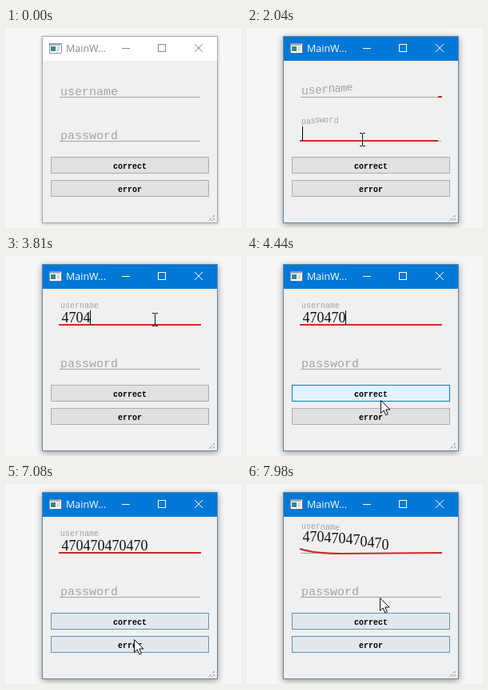
These frames come from a looping animation (294 px wide and 250 px high, 8000 ms). An HTML page:

```html
<!DOCTYPE html>
<html lang="en">
<head>
<meta charset="utf-8">
<title>Floating label form</title>
<style>
html, body { margin: 0; width: 100%; height: 100%; overflow: hidden; background: #f7f7f7; }
svg { display: block; width: 294px; height: 250px; --ink: #8a8a8a; --bar: #fff; --edge: #a9a9a9; }
svg.active { --ink: #fff; --bar: #0078d7; --edge: #5d87aa; }
rect, .crisp { shape-rendering: crispEdges; }
#frame { fill: #f0f0f0; stroke: var(--edge); filter: drop-shadow(0 1px 2px #0004); }
.active #frame { filter: drop-shadow(0 2px 4px #0006); }
#bar { fill: var(--bar); }
.ink { stroke: var(--ink); fill: none; }
#title { font: 12.5px "Open Sans", sans-serif; fill: var(--ink); }
.label { font-family: "Liberation Mono", monospace; fill: #a3a3a3; text-anchor: middle; }
.digit { font: 18px "Liberation Serif", serif; fill: #111; }
.button text { font: bold 10px "Liberation Mono", monospace; text-anchor: middle; }
.rule { fill: #a0a0a0; }
.red { fill: #cb2a2a; }
</style>
</head>
<body>
<svg id="stage" viewBox="0 0 294 250">
  <rect id="frame" x="45.5" y="10.5" width="219" height="233"/>
  <rect id="bar" x="46" y="11" width="218" height="30"/>
  <g class="crisp">
    <path d="M54 19h15v12h-15z" fill="#fff" stroke="#777" stroke-width=".8"/>
    <path d="M55 19.5h13v2h-13z" fill="#9bb4c8"/>
    <path d="M56 23h6v6h-6z" fill="#36858a"/>
    <path d="M64 23h3v6h-3z" fill="#d5d9dc"/>
  </g>
  <text id="title" x="75" y="30">MainW...</text>
  <path class="ink crisp" d="M145 25.5h10M190.500 20.500h9v9h-9z"/>
  <path class="ink" d="M236 20l10 10M246 20l-10 10"/>
  <path class="crisp" d="M259 234h2v2h-2zM255 238h2v2h-2zM259 238h2v2h-2zM259 230" fill="#b4b4b4"/>
  <path class="crisp" d="M253 240h2v1h-2zM257 240h2v1h-2zM257 236h2v1h-2z" fill="#c4c4c4"/>
  <rect class="rule" x="67" y="86" width="176" height="1"/>
  <rect class="rule" x="67" y="141" width="176" height="1"/>
  <rect class="red" id="userLine" y="85" height="2"/>
  <rect class="red" id="passLine" y="140" height="2"/>
  <path id="string" fill="none" stroke="#cb2a2a" stroke-width="2"/>
  <g class="button" id="correct">
    <rect x="56.5" y="161.5" width="197" height="20"/><text x="155" y="176">correct</text>
  </g>
  <g class="button" id="error">
    <rect x="56.5" y="190.500" width="197" height="20"/><text x="155" y="205">error</text>
  </g>
  <g id="letters"></g>
  <rect id="caret" width="1" height="18" fill="#000"/>
  <path id="arrow" d="M.5 .5v16l3.700-3.500 2.500 5.800 2.600-1.100-2.500-5.700h5.200z" fill="#fff" stroke="#111"/>
  <path id="beam" class="crisp" d="M-3 -7.500h2.500M1 -7.500h2.500M-3 8.500h2.500M1 8.500h2.500M.5 -7v15" fill="none" stroke="#111"/>
</svg>
<script>
const LOOP = 8000, SPAN = 178, LEFT = 66;
const FOCUS = [575, 1575, 2555];
const KEYS = [3450, 3540, 3630, 3810, 3930, 4050, 5850, 5960, 6070, 6180, 6290, 6390];
const JERK = 7700;
// Pointer path: time, x, y
const PATH = [
  [180, 269, 12], [420, 121, 75], [570, 121, 75], [800, 113, 73], [1410, 113, 73],
  [1560, 144, 139], [2070, 144, 139], [2190, 150, 142], [2250, 150, 142], [2540, 186, 79],
  [4080, 186, 79], [4430, 167, 180], [6720, 167, 180], [7080, 160, 194], [7400, 163, 198],
  [7740, 163, 198], [7960, 166, 142]
];

const $ = id => document.getElementById(id);
const ramp = (t, start, length) => Math.min(1, Math.max(0, (t - start) / length));
const mix = (a, b, k) => a + (b - a) * k;
const set = (el, attrs) => { for (const k in attrs) el.setAttribute(k, attrs[k]); };
const show = (el, on) => el.setAttribute('visibility', on ? 'visible' : 'hidden');

function glyphs(word, cls) {
  return [...word].map(ch => {
    const el = document.createElementNS('http://www.w3.org/2000/svg', 'text');
    el.textContent = ch;
    el.setAttribute('class', cls);
    return $('letters').appendChild(el);
  });
}
const user = glyphs('username', 'label');
const pass = glyphs('password', 'label');
const digits = glyphs('470470470470', 'digit');

// Each letter leaves a little after its left neighbour
function rise(t, start, i) {
  const p = ramp(t, start + 110 + 22 * i, 330);
  return p + 0.44 * Math.sin(Math.PI * p ** 1.3);
}
function fall(t, start, i) {
  const p = ramp(t, start + 190 + 13 * i, 300);
  return 1 - p - 0.08 * Math.sin(Math.PI * p);
}

// Upward pull on the text, strongest at the left end
function pull(t, x) {
  const g = Math.sin(ramp(t, JERK, 280) * Math.PI / 2);
  return g * Math.cos(Math.PI / 2 * ramp(x, LEFT, 112));
}

function placeLabel(els, base, up, lift) {
  els.forEach((el, i) => {
    const k = up(i), x = mix(72.5 + 9 * i, 71 + 6 * i, k);
    set(el, { x, y: mix(base, base - 19, k) - lift(x), 'font-size': mix(15, 10, Math.min(1, k)) });
  });
}

function setLine(el, from, to) {
  set(el, { x: Math.round(from), width: Math.max(0, Math.round(to) - Math.round(from)) });
}

function paintButton(id, hover, pressed) {
  const blend = (a, b) => `rgb(${a.map((v, i) => Math.round(mix(v, b[i], hover)))})`;
  set($(id).firstElementChild, {
    fill: pressed ? '#cce4f7' : blend([225, 225, 225], [229, 241, 251]),
    stroke: pressed ? '#005499' : blend([173, 173, 173], [0, 120, 215])
  });
}

function pointer(t) {
  const n = PATH.findIndex(p => p[0] > t);
  if (n < 0) return PATH[PATH.length - 1].slice(1);
  const a = PATH[Math.max(0, n - 1)], b = PATH[n];
  const k = ramp(t, a[0], b[0] - a[0] || 1), e = k * k * (3 - 2 * k);
  return [1, 2].map(j => Math.round(mix(a[j], b[j], e)));
}

function drawPointer(t) {
  const [x, y] = pointer(t);
  const editing = x >= 66 && x <= 243 && (y > 57 && y < 88 || y > 112 && y < 142);
  for (const id of ['arrow', 'beam']) {
    set($(id), { transform: `translate(${x} ${y})` });
    show($(id), t >= 180 && editing === (id === 'beam'));
  }
}

function draw(t) {
  const [first, second, third] = FOCUS;
  $('stage').classList.toggle('active', t >= first);

  placeLabel(user, 84, i => t < second ? rise(t, first, i) : t < third ? fall(t, second, i) : rise(t, third, i),
    x => 9 * pull(t, x));
  placeLabel(pass, 139, i => t < third ? rise(t, second, i) : fall(t, third, i), () => 0);

  const [a, b, c] = FOCUS.map(s => LEFT + SPAN * ramp(t, s, 480));
  const cut = 120 * (ramp(t, 4590, 600) - ramp(t, 5850, 570));
  if (t < second) setLine($('userLine'), LEFT, a);
  else if (t < third) setLine($('userLine'), b, LEFT + SPAN);
  else setLine($('userLine'), LEFT, c - cut);
  if (t < third) setLine($('passLine'), LEFT, b);
  else setLine($('passLine'), c, LEFT + SPAN);

  const g = pull(t, LEFT), jerked = t >= JERK;
  show($('userLine'), !jerked);
  show($('string'), jerked);
  set($('string'), { d: `M66 ${86 - 5 * g}Q85 ${86 + g} 118 ${86 + g}T244 86` });

  digits.forEach((el, i) => {
    const x = 69.5 + 9 * i;
    set(el, { x, y: 83 - 11 * pull(t, x) });
    show(el, t >= KEYS[i]);
  });

  const last = [...FOCUS, ...KEYS].filter(s => s <= t).pop();
  const typed = KEYS.filter(s => s <= t).length;
  set($('caret'), { x: 69 + 9 * typed, y: t >= second && t < third ? 123 : 68 });
  show($('caret'), last !== undefined && (t - last) % 1060 < 530);

  paintButton('correct', ramp(t, 4320, 110) - 0.55 * ramp(t, 6800, 150), t >= 4590 && t < 4700);
  paintButton('error', 0.45 * ramp(t, 6960, 100) + 0.55 * (ramp(t, 7100, 100) - ramp(t, 7790, 120)),
    t >= 7590 && t < JERK);
  drawPointer(t);
}

function tick() {
  draw(performance.now() % LOOP);
  requestAnimationFrame(tick);
}
tick();
</script>
</body>
</html>
```
